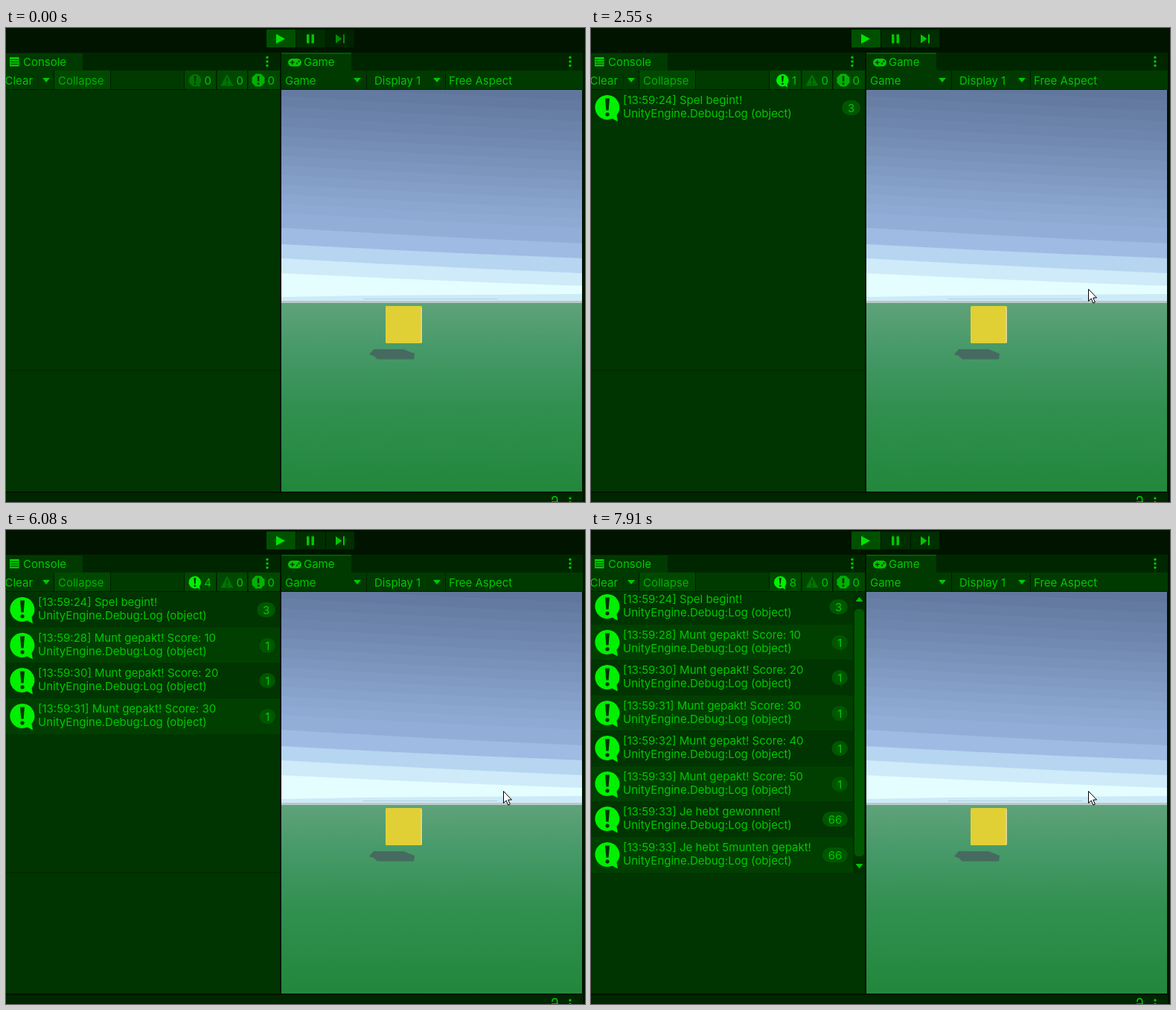
Recreate the animation shown at these times as an HTML page. Size 778 px wide and 636 px high, loop 8 s.

```html
<!DOCTYPE html>
<html lang="nl">
<head>
<meta charset="utf-8">
<title>Console</title>
<style>
  html, body { margin: 0; width: 100%; height: 100%; overflow: hidden; background: #001400; }
  svg { display: block; width: 778px; height: 636px; }
  text { font: 15px Inter, "Noto Sans", sans-serif; fill: #00c800; white-space: pre; }
  .off { visibility: hidden; }
  .ink { fill: #00c800; }
  .line { fill: #001c00; }
  .lit { fill: #004800; }
</style>
</head>
<body>
<svg id="stage" viewBox="0 0 778 636" xmlns="http://www.w3.org/2000/svg">
  <defs>
    <linearGradient id="grass" x1="0" y1="0" x2="0" y2="1">
      <stop offset="0" stop-color="#5fa27a"/>
      <stop offset=".25" stop-color="#469968"/>
      <stop offset=".55" stop-color="#319050"/>
      <stop offset="1" stop-color="#22873b"/>
    </linearGradient>
    <clipPath id="view"><path d="M370 83H774V622H370z"/></clipPath>
    <clipPath id="list"><path d="M0 83H368V460H0z"/></clipPath>
    <g id="balloon">
      <path d="M22 7a16.5 16.5 0 1 0 6.5 31.6L36 42.5L34.5 34A16.5 16.5 0 0 0 22 7z"/>
      <path d="M19 11.5h6l-1.4 16h-3.2z" fill="#003400"/>
      <circle cx="22" cy="32.8" r="2.6" fill="#003400"/>
    </g>
    <g id="kebab" class="ink">
      <circle cy="-5.5" r="1.7"/><circle r="1.7"/><circle cy="5.5" r="1.7"/>
    </g>
    <path id="drop" class="ink" d="M-5-3H5L0 3z"/>
  </defs>

  <rect width="778" height="636" fill="#001400"/>

  <!-- play controls -->
  <rect x="350" y="2" width="39" height="24" fill="#005000"/>
  <rect x="390" y="2" width="39" height="24" fill="#002e00"/>
  <rect id="stepBox" x="430" y="2" width="38" height="24" fill="#002e00"/>
  <path d="M363 8L375 14.5L363 21z" fill="#00e400"/>
  <path class="ink" d="M404 8.500h3.500v12h-3.500zM410.500 8.500h3.500v12h-3.500z"/>
  <path id="stepIcon" class="ink" d="M443 8.500L451.500 14.500L443 20.500zM453 8.500h2v12h-2z"/>

  <!-- tab bars -->
  <path d="M0 33H368V57H0zM370 33H775V57H370z" fill="#002600"/>
  <path d="M0 34H103V57H0zM370 34H464V57H370z" fill="#003a00"/>
  <rect x="370" y="33" width="94" height="2" fill="#005a00"/>
  <path class="ink" d="M5 39h12.500v12.500h-12.500z"/>
  <path d="M6 42.500h10.500M6 45.500h10.500M6 48.500h10.500" stroke="#003a00" stroke-width="1.200"/>
  <text x="23" y="51">Console</text>
  <use href="#kebab" x="351" y="45"/>
  <rect class="ink" x="379" y="41" width="18" height="10.500" rx="5.200"/>
  <path d="M382 46.200h5.500M384.700 43.500v5.500" stroke="#003a00" stroke-width="1.500"/>
  <circle cx="391" cy="47.500" r="1.200" fill="#003a00"/><circle cx="393.500" cy="44.800" r="1.200" fill="#003a00"/>
  <text x="400" y="51">Game</text>
  <use href="#kebab" x="758" y="45"/>

  <!-- toolbars -->
  <path d="M0 57H368V83H0zM370 57H775V83H370z" fill="#003a00"/>
  <path class="lit" d="M65 57H141V82H65zM240 57H368V82H240z"/>
  <path class="line" d="M64 57h1v25h-1zM140 57h1v25h-1zM239 57h1v25h-1zM282 57h1.500v25h-1.500zM324 57h1.500v25h-1.500zM484 57h1v25h-1zM590 57h1v25h-1zM0 82h368v1H0zM370 82h404v1H370z"/>
  <rect x="43" y="62" width="1" height="16" fill="#003000"/>
  <text x="-1.500" y="76">Clear</text>
  <use href="#drop" x="54" y="70"/>
  <text x="70" y="76" style="fill:#00b000">Collapse</text>
  <g id="tally"><use href="#balloon" transform="translate(-11 -11.500) scale(.5)"/></g>
  <text id="total" x="276" y="76" text-anchor="end"></text>
  <path d="M297 62L305.500 77.500H288.500z" fill="#007400"/>
  <path d="M297 67v5.500M297 74v2" stroke="#004800" stroke-width="2"/>
  <text x="319" y="76" text-anchor="end">0</text>
  <path d="M335.500 61.500h7l5 5v7l-5 5h-7l-5-5v-7z" fill="#00b400"/>
  <path d="M339 64.500v7M339 73.500v2.500" stroke="#003400" stroke-width="2.600"/>
  <text x="361" y="76" text-anchor="end">0</text>
  <text x="375" y="76">Game</text>
  <use href="#drop" x="472" y="70"/>
  <text x="495" y="76">Display 1</text>
  <use href="#drop" x="579" y="70"/>
  <text x="595" y="76">Free Aspect</text>

  <!-- console -->
  <rect y="83" width="368" height="539" fill="#003400"/>
  <rect y="459" width="368" height="1" fill="#002600"/>
  <g clip-path="url(#list)">
    <g id="rows"></g>
    <g id="bar" class="off">
      <rect x="352" y="83" width="16" height="377" fill="#003000"/>
      <rect x="354" y="106" width="13" height="332" rx="5" fill="#005800"/>
      <path class="ink" d="M355.500 96h10l-5-6zM355.500 448h10l-5 6z"/>
    </g>
  </g>

  <!-- game view -->
  <g clip-path="url(#view)">
    <g id="sky"></g>
    <path d="M370 361L480 359L774 357V367H370z" fill="#cdeaf8"/>
    <path d="M480 363.500H660" stroke="#b2d0e2"/>
    <rect x="370" y="366" width="404" height="3" fill="#b8cac4"/>
    <rect x="370" y="369" width="404" height="253" fill="url(#grass)"/>
    <path d="M488 438L494 431H534L549 437L548 444.500H499L494 440z" fill="#466a60"/>
    <rect x="510" y="373" width="49" height="50" rx="1.500" fill="#e0d035"/>
    <path d="M558.200 375V422" stroke="#ded9a0" stroke-width="1.600"/>
  </g>

  <!-- bottom panel -->
  <rect y="624" width="775" height="12" fill="#002600"/>
  <path d="M734 633v-1a3.300 3.300 0 0 1 6.600 0v4M733 636h9" fill="none" stroke="#00c800" stroke-width="1.600"/>
  <use href="#kebab" x="758" y="636.500"/>

  <circle id="click" class="off" cx="667" cy="350" r="15" fill="#ff0" opacity=".45"/>
  <path id="cursor" class="off" d="M.5.5V16.500L4.200 13L6.800 19L9.300 18L6.800 12H11.500z" fill="#fff" stroke="#000" stroke-linejoin="round"/>
</svg>

<script>
const LOOP = 8000, ROW = 47.57, SCROLL_AT = 7700;
const logs = [
  [50, "13:59:24", "Spel begint!", 3],
  [3510, "13:59:28", "Munt gepakt! Score: 10", 1],
  [4930, "13:59:30", "Munt gepakt! Score: 20", 1],
  [6080, "13:59:31", "Munt gepakt! Score: 30", 1],
  [6890, "13:59:32", "Munt gepakt! Score: 40", 1],
  [7700, "13:59:33", "Munt gepakt! Score: 50", 1],
  [7700, "13:59:33", "Je hebt gewonnen!", 66],
  [7700, "13:59:33", "Je hebt 5munten gepakt!", 66]
];
const $ = id => document.getElementById(id);

function add(parent, tag, attrs, text) {
  const el = document.createElementNS("http://www.w3.org/2000/svg", tag);
  for (const k in attrs) el.setAttribute(k, attrs[k]);
  if (text !== undefined) el.textContent = text;
  return parent.appendChild(el);
}
const show = (el, on) => el.classList.toggle("off", !on);
const move = (el, x, y) => el.setAttribute("transform", `translate(${x} ${y})`);

// Tilted colour bands, each painted over the lower part of the one before.
function paintSky() {
  const band = (y, drop, fill) => add($("sky"), "path", {
    d: `M370 ${y}Q572 ${y + drop * .58} 774 ${y + drop}V370H370z`, fill
  });
  const top = [96, 118, 156], low = [146, 174, 216];
  for (let i = 0; i <= 14; i++) {
    const k = i / 14;
    const rgb = top.map((c, j) => Math.round(c + (low[j] - c) * k));
    band(62 + 186 * Math.pow(k, .95), 20, `rgb(${rgb})`);
  }
  band(268, 21, "#9fbbe3");
  band(290, 19, "#b6d5f0");
  band(309, 20, "#cfeaf8");
  band(329, 17, "#e4fdff");
}

const rows = logs.map(([at, time, msg, count], i) => {
  const g = add($("rows"), "g");
  add(g, "rect", { width: 368, height: 48, fill: i % 2 ? "#003f00" : "#003400" });
  add(g, "use", { href: "#balloon", fill: "#00f000" });
  add(g, "text", { x: 43, y: 19 }, `[${time}] ${msg}`);
  add(g, "text", { x: 43, y: 37 }, "UnityEngine.Debug:Log (object)");
  const badge = add(g, "g");
  const pill = add(badge, "rect", { y: 14, height: 20, rx: 10, fill: "#005600" });
  const num = add(badge, "text", { y: 29.5, "text-anchor": "middle" }, count);
  const w = num.getComputedTextLength() + 15.5;
  pill.setAttribute("x", 362 - w);
  pill.setAttribute("width", w);
  num.setAttribute("x", 362 - w / 2);
  return { g, badge, num, at, count };
});

function placeCursor(t) {
  const k = Math.min(8, Math.floor((t - 850) / 52.5 + .05)) / 8, q = 1 - k;
  const bend = (a, b, c) => Math.round(q * q * a + 2 * q * k * b + k * k * c);
  move($("cursor"), bend(696, 550, 668), bend(626, 440, 350));
}

function draw(t) {
  const scrolled = t >= SCROLL_AT;
  rows.forEach((r, i) => {
    show(r.g, t >= r.at);
    move(r.g, 0, Math.round(83 + ROW * i) - (scrolled ? 4 : 0));
    move(r.badge, scrolled ? -17 : 0, 0);
    r.num.textContent = r.count > 9 && t < 7910 ? 35 : r.count;
  });
  show($("bar"), scrolled);

  const total = rows.filter(r => t >= r.at).length;
  $("total").textContent = total;
  move($("tally"), 263.5 - $("total").getComputedTextLength(), 70);
  $("tally").setAttribute("fill", total ? "#00f000" : "#007400");

  const ready = t >= 140;
  $("stepBox").setAttribute("fill", ready ? "#002e00" : "#002200");
  $("stepIcon").setAttribute("opacity", ready ? 1 : .65);

  show($("cursor"), t >= 850);
  if (t >= 850) placeCursor(t);
  show($("click"), t >= 2450 && t < 2550);
}

paintSky();
const start = performance.now();
function tick() {
  draw((performance.now() - start) % LOOP);
  requestAnimationFrame(tick);
}
tick();
</script>
</body>
</html>
```
